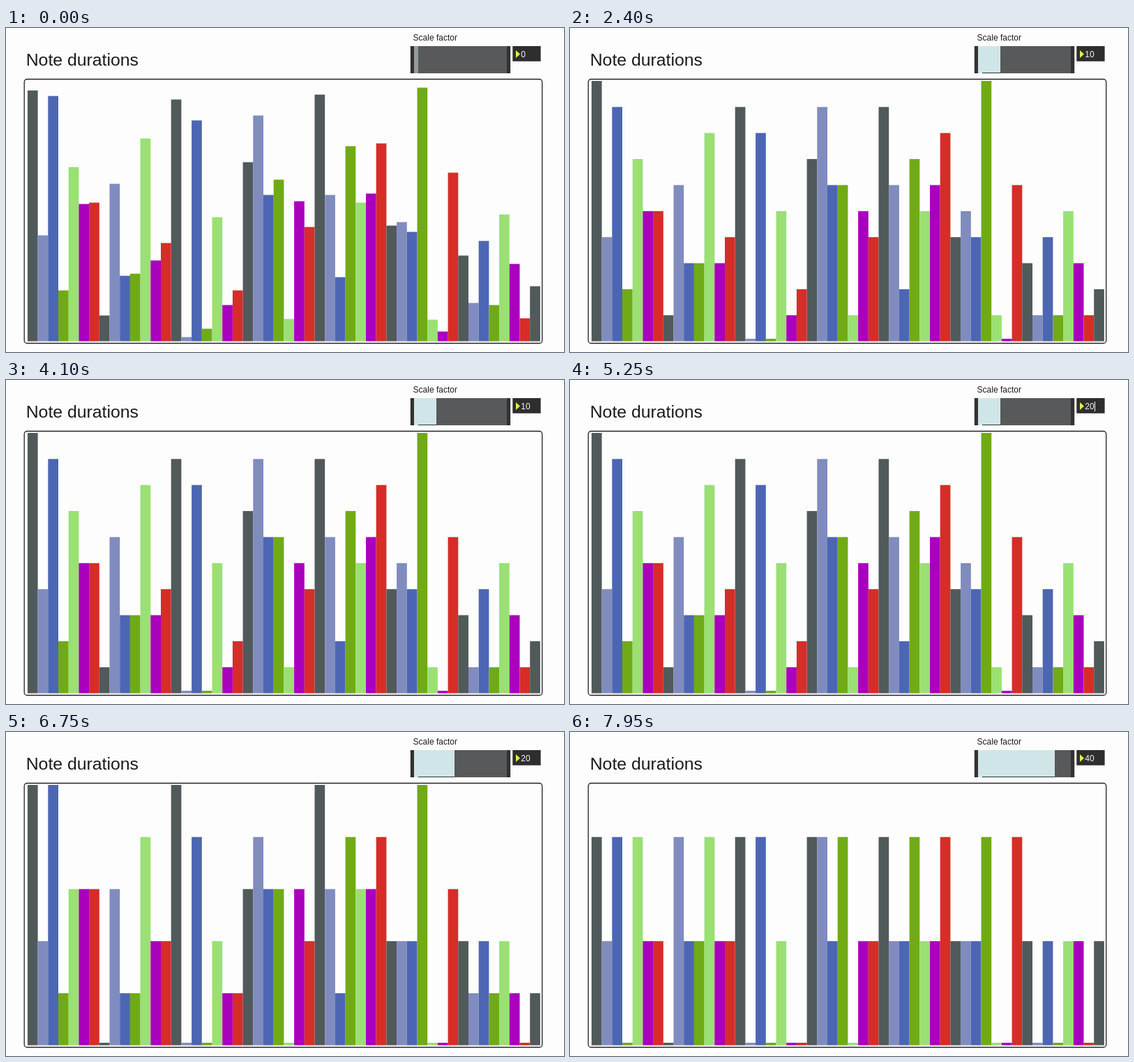
Recreate the animation shown at these times as an HTML page with a canvas. Size 800 px wide and 465 px high, loop 8000 ms.

```html
<!DOCTYPE html>
<html lang="en">
<head>
<meta charset="utf-8">
<title>Note durations</title>
<style>
  html, body { margin: 0; width: 100%; height: 100%; overflow: hidden; background: #fefdfe; }
  canvas { display: block; width: 100%; height: 100%; }
</style>
</head>
<body>
<canvas id="stage" width="800" height="465"></canvas>
<script>
const ctx = document.getElementById('stage').getContext('2d');
const LOOP = 8000, BASE = 449.6, RANGE = 373.6, MIN_HEIGHT = 3.6;
const LEFT = 30.9, PITCH = 14.7;
const KEY_GAP = 150;
const FONT = '"Liberation Sans", Arial, sans-serif';
const PAPER = '#fefdfe', INK = '#1c1a1c', LIT = '#f4f4f4';
const COLORS = ['#505a5a', '#808cbe', '#4c66b4', '#70aa16', '#9ae072', '#aa00be', '#d62d28'];

// The plotted durations, in pixels of bar height
const DURATIONS = [
  360, 152, 352, 73, 250, 197, 199, 37, 226, 94, 97, 291, 116, 141,
  347, 6, 317, 18, 178, 52, 73, 257, 324, 210, 232, 32, 201, 164,
  354, 210, 92, 280, 199, 212, 284, 166, 171, 157, 364, 31, 14, 242,
  123, 55, 144, 52, 182, 111, 33, 79
];

// Each scale factor is typed digit by digit, then applied
const ENTRIES = [
  { scale: 0, typed: 0, applied: 0 },
  { scale: 10, typed: 1600, applied: 2100 },
  { scale: 20, typed: 5050, applied: 5600 },
  { scale: 40, typed: 7350, applied: 7800 }
];

function box(color, left, top, right, bottom) {
  ctx.fillStyle = color;
  ctx.fillRect(left, top, right - left, bottom - top);
}

function label(text, x, y, size, color) {
  ctx.font = `${size}px ${FONT}`;
  ctx.fillStyle = color;
  ctx.fillText(text, x, y);
}

function barHeight(duration, scale) {
  if (!scale) return duration;
  const unit = RANGE * scale / 100;
  return Math.max(MIN_HEIGHT, Math.round(duration / unit) * unit);
}

function drawBars(scale) {
  DURATIONS.forEach((duration, i) => {
    const x = LEFT + PITCH * i;
    box(COLORS[i % COLORS.length], x, BASE - barHeight(duration, scale), x + PITCH, BASE);
  });
}

function drawSlider(scale) {
  const end = 591 + 2.6 * scale;
  box('#323232', 579.8, 26, 723.2, 65);
  box('#58595a', 585, 26, 718, 65);
  box(scale ? '#d0e5e8' : '#929c9a', 585, 26, end, 65);
  box('#2c3434', 591, 64, end, 65);
}

function drawNumber(text, typing) {
  box('#2e2e2e', 726.3, 26, 766.6, 47.8);
  ctx.fillStyle = '#e8ee46';
  ctx.beginPath();
  ctx.moveTo(731, 32);
  ctx.lineTo(737, 37.5);
  ctx.lineTo(731, 43);
  ctx.fill();
  label(text, 738.3, 41.6, 12, LIT);
  if (typing) {
    const x = Math.round(738.3 + ctx.measureText(text).width);
    box(LIT, x, 31, x + 1, 45);
  }
}

function drawFrame() {
  ctx.beginPath();
  ctx.roundRect(26.2, 73.5, 742.5, 379, 4);
  ctx.strokeStyle = '#222';
  ctx.lineWidth = 1.3;
  ctx.stroke();
}

function draw(time) {
  const entry = ENTRIES.findLast(e => e.typed <= time);
  const { scale } = ENTRIES.findLast(e => e.applied <= time);
  const keys = 1 + Math.floor((time - entry.typed) / KEY_GAP);

  box(PAPER, 0, 0, 800, 465);
  label('Note durations', 28.7, 53.6, 24.8, INK);
  label('Scale factor', 583.6, 18.3, 12, INK);
  drawFrame();
  drawBars(scale);
  drawSlider(scale);
  drawNumber(String(entry.scale).slice(0, keys), time < entry.applied);
}

const start = performance.now();
function tick() {
  draw((performance.now() - start) % LOOP);
  requestAnimationFrame(tick);
}
tick();
</script>
</body>
</html>
```
